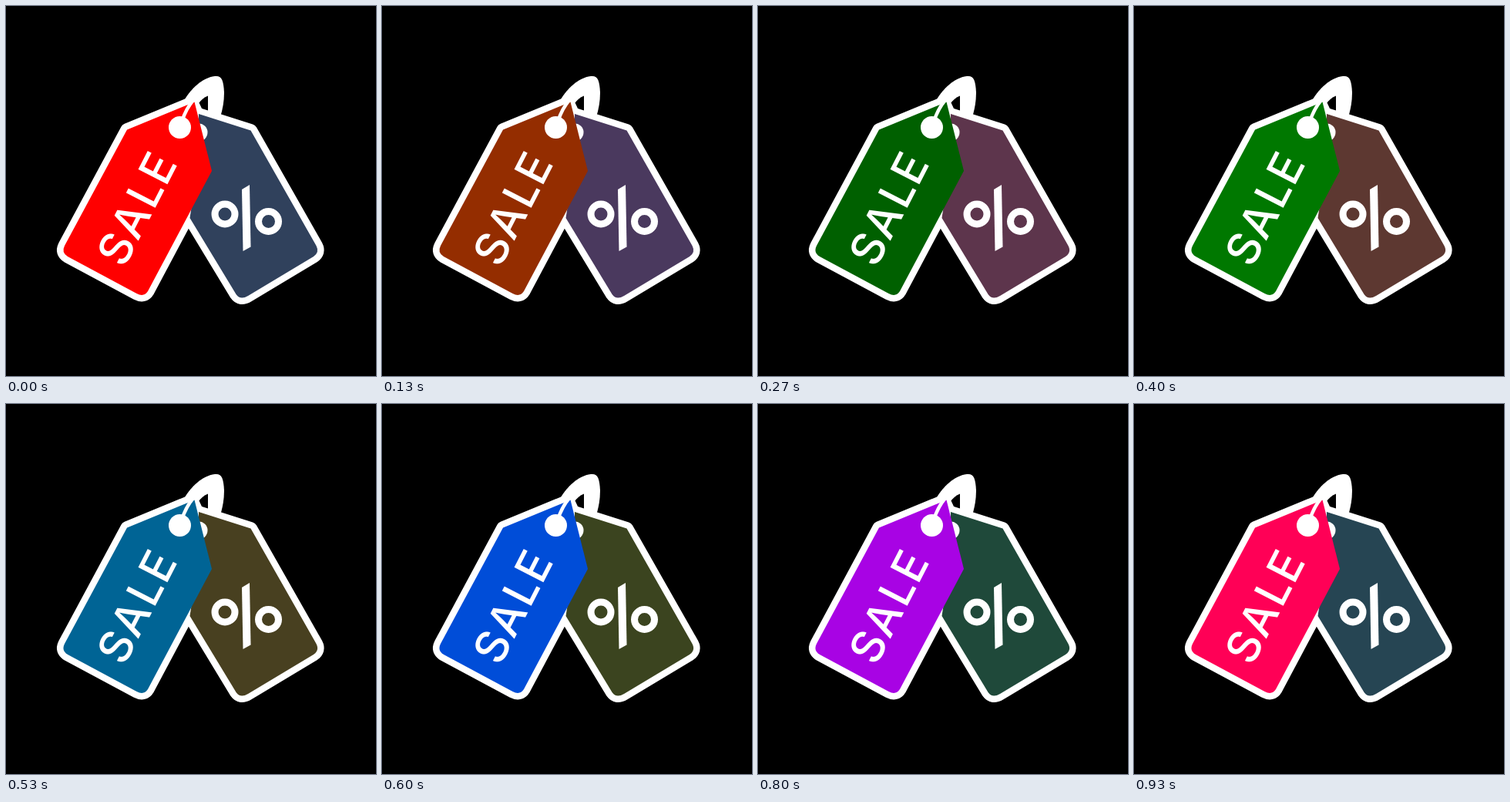
Animation, 480 px wide and 480 px high, one loop 990 ms. Source, as an HTML page:

```html
<!DOCTYPE html>
<html lang="en">
<head>
<meta charset="utf-8">
<title>Sale tags</title>
<style>
  html, body { margin: 0; width: 100%; height: 100%; overflow: hidden; background: #000; }
  svg { display: block; width: 100vw; height: 100vh; }
  text { font: 500 58.5px Inter, sans-serif; font-kerning: none; }
</style>
</head>
<body>
<svg viewBox="0 0 480 480">
  <defs>
    <path id="saleTag" d="M244.500 124.500 L157 160.500 L76 311 Q71.500 320 80 325 L169.500 373 Q179 378 184 370 L267 214 Z"/>
    <path id="offTag" d="M250 140 L317.500 161.500 L402.500 311 Q407 319.500 399 325 L314 376 Q304 382 298.500 374 L238.500 275 L250 200 Z"/>
  </defs>
  <rect width="480" height="480"/>
  <g fill="#fff" stroke="#fff" stroke-width="17" stroke-linejoin="round">
    <use href="#saleTag"/>
    <use href="#offTag"/>
  </g>
  <path fill="#fff" d="M232 121 C240 108 254 93 271 91 C280 90 282 96 283 112 C283 124 281 134 278 144 L245 135 Z"/>
  <path d="M262 116.500 C257 118.500 253 122 250.500 125.500 L254 133 L262 135.500 Z"/>
  <use id="off" href="#offTag"/>
  <circle cx="250" cy="164" r="11.500" fill="#fff"/>
  <use id="sale" href="#saleTag"/>
  <circle cx="225.500" cy="157.500" r="14.500" fill="#fff"/>
  <path d="M244 121 Q234 132 228 150" fill="none" stroke="#fff" stroke-width="4.500"/>
  <text fill="#fff" transform="translate(152 343) rotate(-62.800)" x="2 41.500 86.500 121">SALE</text>
  <g fill="none" stroke="#fff" stroke-width="9">
    <circle cx="284" cy="270" r="13"/>
    <circle cx="340.500" cy="279.500" r="13"/>
  </g>
  <path fill="#fff" d="M306 238 L316 232 L317.500 312.500 L307.500 318 Z"/>
</svg>
<script>
const LOOP = 990, STEPS = 15;
const LUMA = [0.213, 0.715, 0.072];
// sine terms of the standard hue-rotation matrix
const SWING = [
  [-0.213, -0.715, 0.928],
  [0.143, 0.140, -0.283],
  [-0.787, 0.715, 0.072]
];
const tags = [
  { el: document.getElementById('sale'), rgb: [255, 0, 0] },
  { el: document.getElementById('off'), rgb: [48, 65, 92] }
];

function rotateHue(rgb, angle) {
  const c = Math.cos(angle), s = Math.sin(angle);
  const out = SWING.map((row, i) => {
    const v = rgb.reduce((sum, x, j) =>
      sum + x * (LUMA[j] + c * ((i === j) - LUMA[j]) + s * row[j]), 0);
    return Math.round(Math.min(255, Math.max(0, v)));
  });
  return `rgb(${out})`;
}

function draw(ms) {
  // steps of 1/15 s, aligned to hundredths
  const step = Math.floor((Math.floor(ms % LOOP / 10) + 0.5) * 3 / 20);
  const angle = step / STEPS * 2 * Math.PI;
  for (const { el, rgb } of tags) el.setAttribute('fill', rotateHue(rgb, angle));
}

const start = performance.now();
function tick() {
  draw(performance.now() - start);
  requestAnimationFrame(tick);
}
tick();
</script>
</body>
</html>
```
